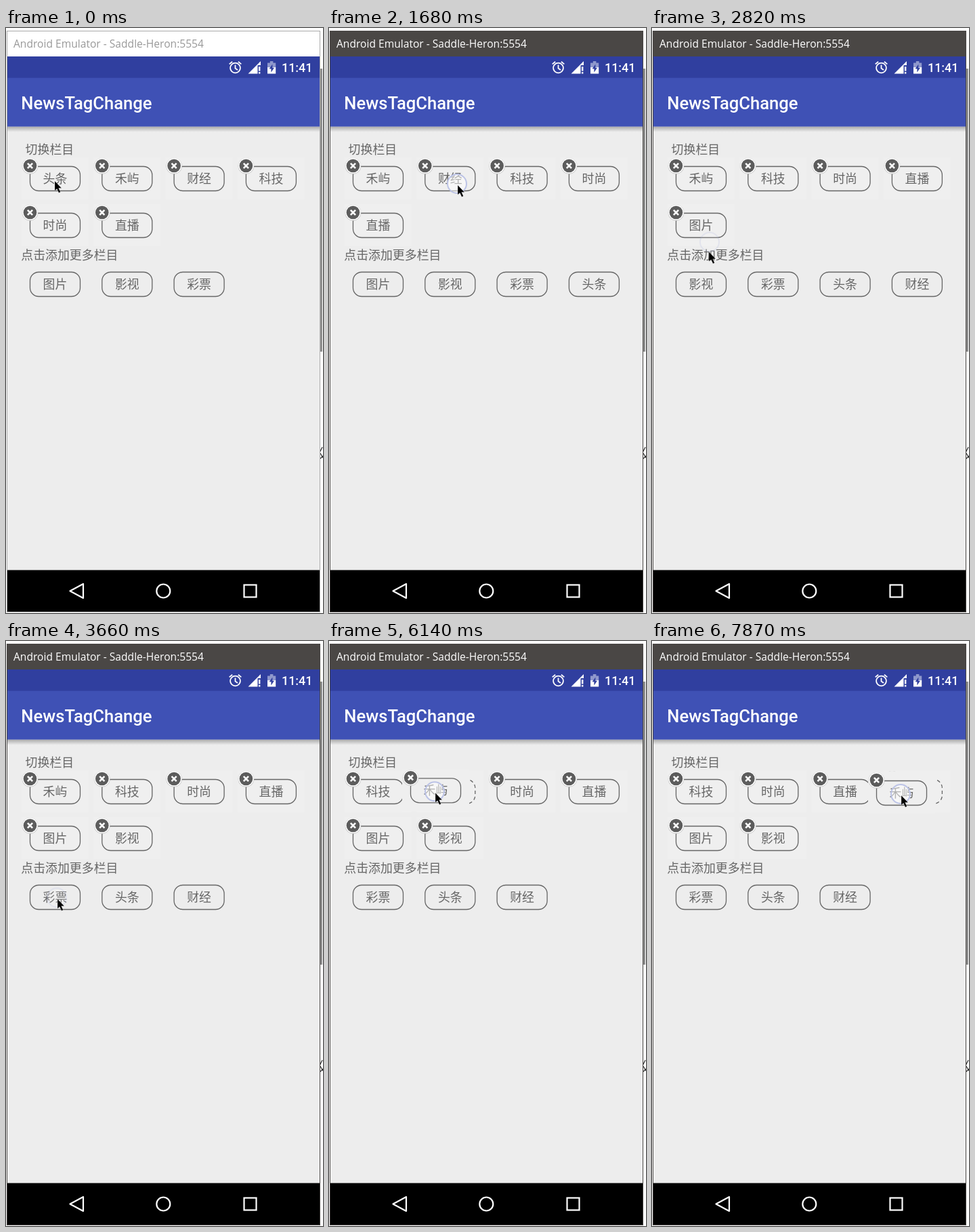
An HTML page for the animation above (8 s loop, 468x864 px).

```html
<!DOCTYPE html>
<html lang="zh-CN">
<head>
<meta charset="utf-8">
<title>NewsTagChange</title>
<style>
  html, body { margin: 0; width: 100%; height: 100%; overflow: hidden; background: #fff; }
  svg { display: block; width: 468px; height: 864px; }
  .cjk { font: 17.9px "Noto Sans CJK SC", "Noto Sans CJK", sans-serif; fill: #666; }
  .cell text { text-anchor: middle; }
  .pill { fill: none; stroke: #666; stroke-width: 1.3; }
  .dashed { stroke-dasharray: 5 4; }
  .panel { fill: #efefef; }
  .roboto { font-family: Roboto, sans-serif; font-weight: 500; fill: #fff; }
  .line { fill: none; stroke: #fff; stroke-width: 2.2; }
  #caption { font: 15.6px "Open Sans", "Noto Sans", sans-serif; fill: #999; }
  #bar { fill: #fff; stroke: #aaa; }
  .focused #caption { fill: #fff; }
  .focused #bar { fill: #4a4745; stroke: #4a4745; }
</style>
</head>
<body>
<svg id="stage" viewBox="0 0 468 864">
  <defs>
    <linearGradient id="shade" x2="0" y2="1">
      <stop stop-color="#000" stop-opacity=".28"/>
      <stop offset="1" stop-color="#000" stop-opacity="0"/>
    </linearGradient>
    <g id="badge">
      <circle r="11.8" cy=".4" fill="#c8c8c8"/>
      <circle r="11.2" fill="#fff"/>
      <circle r="9.8" fill="#5c5c5c"/>
      <path d="M-3.6-3.6 3.6 3.6M3.6-3.6-3.6 3.6" stroke="#fff" stroke-width="2.6"/>
    </g>
  </defs>

  <!-- desktop behind the window -->
  <rect width="468" height="864" fill="#fff"/>
  <rect x="463" y="60" width="4" height="418" fill="#8e8e8e"/>
  <path d="M463 627l4-8M464 636l4-4M464 628l4 7" fill="none" stroke="#222" stroke-width="1.2"/>

  <!-- window -->
  <rect id="bar" x="1.5" y="4.5" width="462" height="858"/>
  <text id="caption" x="11" y="29">Android Emulator - Saddle-Heron:5554</text>
  <rect x="2" y="42" width="461" height="32" fill="#303f9f"/>
  <rect x="2" y="145" width="461" height="656" fill="#ededed"/>
  <rect x="2" y="145.6" width="461" height="8" fill="url(#shade)"/>
  <rect x="2" y="73.7" width="461" height="71.9" fill="#3f51b5"/>
  <text class="roboto" x="22.3" y="120" font-size="25.6">NewsTagChange</text>
  <text class="roboto" x="407" y="65" font-size="17.9">11:41</text>

  <!-- status icons -->
  <g fill="none" stroke="#fff" stroke-width="1.8">
    <circle cx="338.5" cy="59" r="7.4"/>
    <path d="M338.5 54.5V59.5L342 62M329.7 53.4l4.4-3.7M347.3 53.4l-4.4-3.7"/>
  </g>
  <path d="M357.5 67.5 376 49V55H371.5V67.5ZM373 57h2.4v6.5H373ZM373 65h2.4v2.5H373Z" fill="#fff"/>
  <path d="M386 51.5h3.8V49h4.6v2.5h3.8V58H386Z" fill="#8f98cc"/>
  <path d="M386 58h12.2v9.5H386Z" fill="#fff"/>
  <path d="M393.4 53.5 388.6 60.3H391.4V65.5L396 58.7H393.4Z" fill="#303f9f"/>

  <!-- navigation bar -->
  <rect x="2" y="800.6" width="461" height="61.4" fill="#000"/>
  <path class="line" d="M94.5 831.5 114 821V842Z" stroke-linejoin="round"/>
  <circle class="line" cx="232.3" cy="831.5" r="10"/>
  <rect class="line" x="351.5" y="822.5" width="18" height="18"/>

  <text class="cjk" x="28.6" y="186">切换栏目</text>
  <text id="more" class="cjk" x="22.3" y="342">点击添加更多栏目</text>
  <g id="cells"></g>
  <circle id="touch" r="14" fill="#fff" fill-opacity=".5" stroke="#bcc3e6" stroke-width="2"/>
  <path id="cursor" d="M0 0V14.2L3.2 11.4 6 17.4 8.4 16.3 5.7 10.4H10Z" stroke="#fff" stroke-opacity=".45" stroke-width=".6"/>
</svg>
<script>
const LOOP = 8000, TICK = 140, FADE = 160, FOCUS = 400;
const LEFT = 23, COL = 106.3, ROW = 69, X0 = 72.5, TOP_Y = 222.5, MORE_Y = 378.5;
const home = { x: 72, y: 226 };
const $ = id => document.getElementById(id);

// Where the pointer rests, and from when until when
const stops = [
  { ...home, from: 0, to: 830 },
  { x: 190, y: 232, from: 1400, to: 1785 },
  { x: 86, y: 318, from: 2420, to: 2700 },
  { x: 76, y: 381, from: 3200, to: 3660 },
  { ...home, from: 4490, to: 5690 },
  { x: 174, y: 224, from: 6254, to: 6670 },
  { x: 368, y: 228, from: 7840, to: LOOP },
];
const DRAG = stops[4].to;

const presses = [
  { tag: "头条", down: FOCUS, up: 680 },
  { tag: "财经", down: 1530, up: 1780 },
  { tag: "图片", down: 2440, up: 2690 },
  { tag: "影视", down: 3350, up: 3500 },
  { down: 4600, up: LOOP },
];

function pointer(t) {
  const i = stops.findIndex(s => t <= s.to), b = stops[i];
  if (t >= b.from) return b;
  const a = stops[i - 1], k = (t - a.to) / (b.from - a.to);
  return { x: a.x + (b.x - a.x) * k, y: a.y + (b.y - a.y) * k };
}

// A clicked tag moves to the end of the other list
function tagsAt(t) {
  const top = ["头条", "禾屿", "财经", "科技", "时尚", "直播"];
  const more = ["图片", "影视", "彩票"];
  for (const { tag } of presses.filter(p => t >= p.up)) {
    const [from, to] = top.includes(tag) ? [top, more] : [more, top];
    from.splice(from.indexOf(tag), 1);
    to.push(tag);
  }
  return { top, more };
}

function cell(tag, x, y, closable, dashed) {
  return `<g class="cell" transform="translate(${x} ${y})">
    ${closable ? '<rect class="panel" x="-49.5" y="-31.5" width="99" height="62"/>' : ""}
    <rect class="pill ${dashed ? "dashed" : ""}" x="-37" y="-18" width="74" height="36" rx="12.8"/>
    ${dashed ? "" : `<text class="cjk" y="6.6">${tag}</text>`}
    ${closable ? '<use href="#badge" x="-37" y="-19"/>' : ""}</g>`;
}

const grid = (tags, y, closable, hole) => tags.map((tag, i) =>
  cell(tag, X0 + i % 4 * COL, y + Math.floor(i / 4) * ROW, closable, i === hole)).join("");

const place = (id, x, y) => $(id).setAttribute("transform", `translate(${x} ${y})`);

function draw(t) {
  const { x, y } = pointer(t);
  const { top, more } = tagsAt(t);
  const lift = top.length > 4 ? 0 : -ROW;
  let hole = -1, floating = "";
  if (t >= DRAG) {
    const tag = top.shift();
    hole = Math.floor((x - LEFT) / COL);
    top.splice(hole, 0, tag);
    floating = cell(tag, X0 + x - home.x, TOP_Y + y - home.y, true);
  }
  $("cells").innerHTML = grid(top, TOP_Y, true, hole) + grid(more, MORE_Y + lift) + floating;
  $("stage").classList.toggle("focused", t >= FOCUS);
  place("more", 0, lift);
  place("cursor", x, y);

  const press = presses.find(p => t >= p.down && t < p.up + FADE);
  $("touch").setAttribute("opacity", !press ? 0 : t < press.up ? 1 : 0.25);
  if (press) {
    const spot = pointer(Math.min(t, press.up));
    place("touch", spot.x - 1, spot.y - 2);
  }
}

// The screen refreshes in ticks
let shown = -1;
const start = performance.now();
function frame() {
  const t = (performance.now() - start) % LOOP;
  const tick = Math.floor((t + 40) / TICK) * TICK;
  if (tick !== shown) draw(shown = tick);
  requestAnimationFrame(frame);
}
frame();
</script>
</body>
</html>
```
